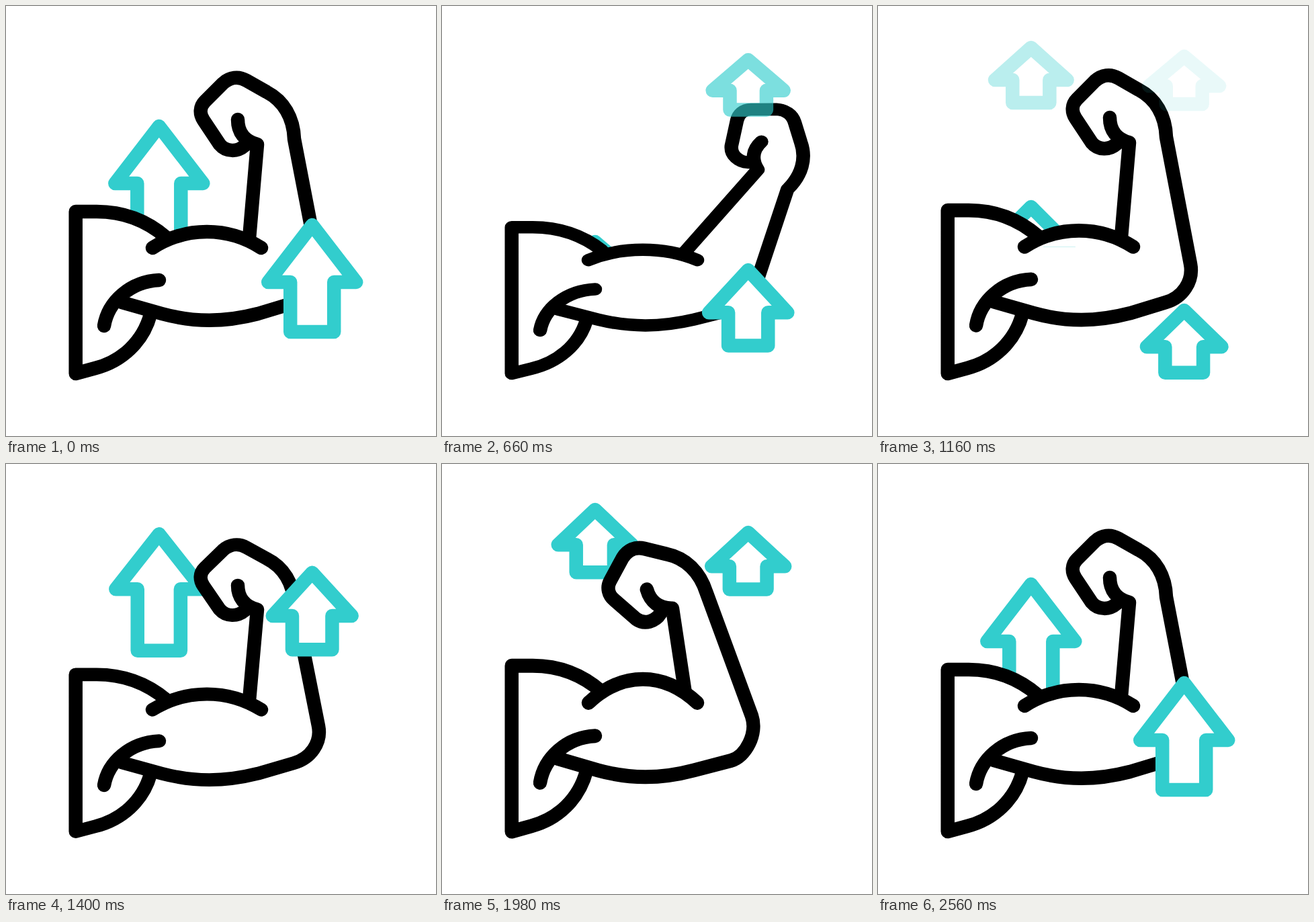
An HTML page that plays this animation: 640x640 px, repeating every 2760 ms.

```html
<!DOCTYPE html>
<html lang="en">
<head>
<meta charset="utf-8">
<title>Strength</title>
<style>
  html, body { margin: 0; width: 100%; height: 100%; overflow: hidden; background: #fff; }
  svg { display: block; width: 100vw; height: 100vh; }
  path { stroke-width: 20.5; stroke-linecap: round; stroke-linejoin: round; }
  .arrow { fill: #fff; stroke: #32cdcd; }
  #arm path { fill: none; stroke: #000; }
  #arm .fill { fill: #fff; stroke: none; }
</style>
</head>
<body>
<svg viewBox="0 0 640 640">
  <g id="back"></g>
  <g id="arm">
    <path class="fill" d="M238 344C210 320 175 306 135 306H103.7V547L133 539C172 529 204 500 215 459Z"/>
    <path d="M238 344C210 320 175 306 135 306H103.7V547L133 539C172 529 204 500 215 459"/>
    <path class="fill" id="limbFill"/>
    <path id="limb"/>
    <path id="wrist"/>
    <path id="bicep" style="fill:#fff"/>
    <path d="M146 476C152 440 185 410 228 408"/>
  </g>
  <g id="front"></g>
</svg>
<script>
const LOOP = 2760, STEP = 20, START = 220, END = 2560;
const $ = id => document.getElementById(id);
const clamp = (v, a = 0, b = 1) => Math.min(b, Math.max(a, v));
const mix = (a, b, k) => a + (b - a) * k;
const smooth = k => k * k * (3 - 2 * k);

// Monotone cubic curve through [x, y] points, flat at extremes and ends.
function curve(...pts) {
  const n = pts.length - 1;
  const d = pts.slice(1).map((p, i) => (p[1] - pts[i][1]) / (p[0] - pts[i][0]));
  const m = pts.map((p, i) =>
    i && i < n && d[i - 1] * d[i] > 0 ? 2 * d[i - 1] * d[i] / (d[i - 1] + d[i]) : 0);
  return x => {
    if (x <= pts[0][0]) return pts[0][1];
    if (x >= pts[n][0]) return pts[n][1];
    const i = pts.findIndex(p => p[0] > x) - 1;
    const h = pts[i + 1][0] - pts[i][0], k = (x - pts[i][0]) / h, e = smooth(k);
    return mix(pts[i][1], pts[i + 1][1], e)
      + h * k * (1 - k) * ((1 - k) * m[i] - k * m[i + 1]);
  };
}

// Arm: weights of the stretched and flexed poses, and height of the whole.
const stretch = curve([220, 0], [440, .5], [640, 1], [860, 0]);
const flex = curve([640, 0], [860, 1], [1160, 0], [1500, 0], [1640, .18], [1980, 1], [2400, 0]);
const height = curve([220, 1], [440, .946], [640, .9], [860, 1.033], [1160, 1.008],
  [1460, .966], [1640, .979], [1980, 1.024], [2560, 1]);

const PIVOT = [418, 325], OUT = 46 * Math.PI / 180, IN = -16 * Math.PI / 180;

function drawArm(t) {
  const e = stretch(t), c = flex(t);
  const a = 1 + e * (Math.cos(OUT) - 1) + c * (Math.cos(IN) - 1);
  const b = e * Math.sin(OUT) + c * Math.sin(IN);
  const pt = (x, y) => {
    const u = x - PIVOT[0], v = y - PIVOT[1];
    return (PIVOT[0] + a * u - b * v).toFixed(2) + ' ' + (PIVOT[1] + b * u + a * v).toFixed(2) + ' ';
  };
  const hand = d => d.replace(/([\d.]+) ([\d.]+)/g, (_, x, y) => pt(+x, +y));
  const blend = (rest, far, near) => rest + e * (far - rest) + c * (near - rest);

  const elbow = [
    [428, 440, 430], [442, 440, 444],
    [453, 455, 452], [435, 434, 438],
    [470, 463, 470], [411, 424, 405],
    [465, 463, 461], [385, 415, 379]
  ].map(p => blend(...p).toFixed(2));
  const limb = 'M172 441L232 458C280 471 325 471 375 458L' + elbow.slice(0, 2).join(' ')
    + 'C' + elbow.slice(2).join(' ')
    + hand('L429 198C428 166 413 141 388 128L358 111C346 104 333 106 323 115'
      + 'L296 142C288 150 288 161 294 170L318 206C328 218 345 217 355 208L362 202');
  $('limb').setAttribute('d', limb);
  $('limbFill').setAttribute('d', limb + 'L' + pt(374, 206) + 'L362 346L380 360L218 360Z');
  $('wrist').setAttribute('d', hand('M345 169C345 188 355 201 374 206') + 'L362 346');

  const top = 360 - blend(32, 22, 46);
  $('bicep').setAttribute('d', `M218 360C268 ${top} 330 ${top} 380 360`);
  $('arm').setAttribute('transform', `translate(0 547) scale(1 ${height(t)}) translate(0 -547)`);
}

// Arrows: tip height and size by age.
const leftTip = curve([0, 360], [50, 299], [130, 184], [137, 179], [215, 123], [355, 92], [470, 68], [515, 62], [535, 61]);
const leftSize = curve([0, 0], [50, .3], [130, 1], [215, 1], [355, .78], [470, .2], [515, .1], [535, .04]);
const rightTip = curve([0, 520], [60, 453], [120, 334], [200, 250], [290, 167], [460, 102], [540, 88], [590, 75]);
const firstTip = curve([0, 326], [110, 232], [220, 148], [330, 105], [430, 82], [480, 75]);
const firstSize = curve([0, 1], [110, .62], [220, .23], [330, .14], [430, .05], [480, 0]);
const rightSize = tip => tip > 250 ? (520 - tip) / 270 : (tip - 75) / 175;
const fade = (age, from, to) => 1 - clamp((age - from) / (to - from));

function makeArrow(layer, x, grow) {
  const el = document.createElementNS('http://www.w3.org/2000/svg', 'path');
  el.setAttribute('class', 'arrow');
  $(layer).append(el);
  return (tip, size, alpha) => {
    const q = clamp(size), wing = 52.5 + 13 * q, shaft = 27 + 5.5 * q;
    const y = tip + 44 + 41 * q, base = tip + 71 + grow * q;
    el.setAttribute('d', `M${x} ${tip}L${x + wing} ${y}H${x + shaft}V${base}H${x - shaft}V${y}H${x - wing}Z`);
    el.setAttribute('opacity', alpha);
  };
}

const left = Array.from({ length: 5 }, () => makeArrow('back', 227.8, 111));
const right = Array.from({ length: 5 }, () => makeArrow('front', 455.7, 88));
const leftStart = [START - 137, 645, 1110, 1510];
const rightStart = [START, 570, 1100, 1520];
const LAST = 1990;

function drawArrows(t) {
  leftStart.forEach((s, i) => {
    const age = t - s;
    left[i](leftTip(age), leftSize(age), age < 0 ? 0 : fade(age, 475, 535));
  });
  rightStart.forEach((s, i) => {
    const age = t - s;
    if (!i) return right[0](firstTip(age), firstSize(age), fade(age, 420, 475));
    const tip = rightTip(age);
    right[i](tip, rightSize(tip), age < 0 ? 0 : fade(age, 545, 595));
  });
  const k = smooth(clamp((t - LAST) / (END - LAST))), on = t > LAST ? 1 : 0;
  left[4](mix(360, 179, k), k, on);
  right[4](mix(520, 326, k), k, on);
}

function draw(now) {
  const raw = Math.floor((now % LOOP) / STEP) * STEP;
  const t = clamp(raw, START, END);
  drawArm(t);
  drawArrows(t);
}

const t0 = performance.now();
function tick() {
  draw(performance.now() - t0);
  requestAnimationFrame(tick);
}
tick();
</script>
</body>
</html>
```
